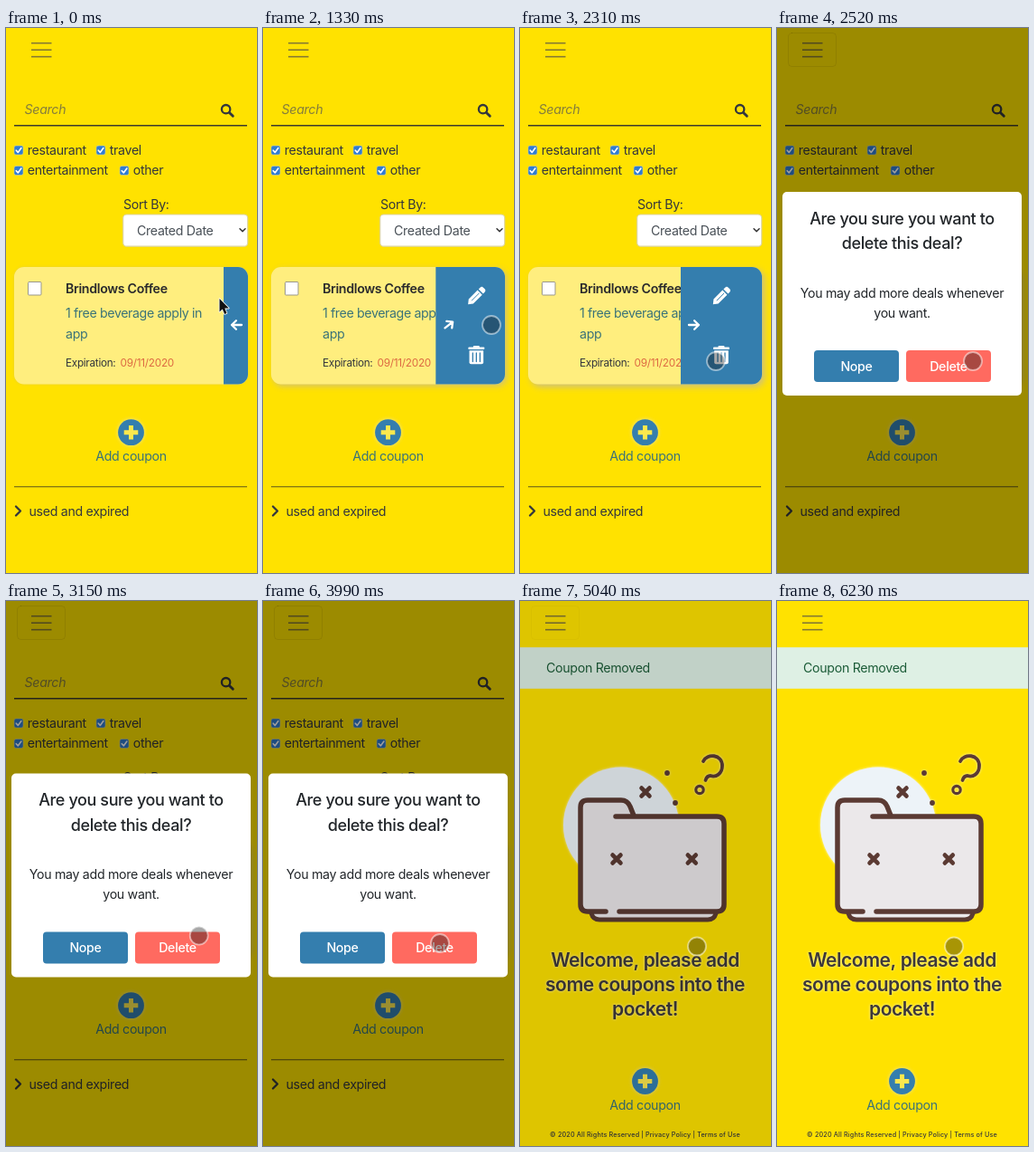
Animation, 278 px wide and 602 px high, one loop 6.3 s. Source, as an HTML page with a canvas:

```html
<!DOCTYPE html>
<html lang="en">
<head>
<meta charset="utf-8">
<title>Coupon pocket</title>
<style>
html, body { margin: 0; width: 100%; height: 100%; overflow: hidden; background: #ffe200; }
canvas { display: block; width: 278px; height: 602px; }
</style>
</head>
<body>
<canvas id="stage"></canvas>
<script>
const W = 278, H = 602, LOOP = 6300, STEP = 70;
const YELLOW = '#ffe200', BLUE = '#347eae', INK = '#33363d', LINK = '#3a7378', BROWN = '#5b3a33';
const canvas = document.getElementById('stage');
const ctx = canvas.getContext('2d');
const ratio = window.devicePixelRatio || 1;
canvas.width = W * ratio;
canvas.height = H * ratio;

const clamp = v => Math.max(0, Math.min(1, v));
const progress = (t, start, length) => clamp((t - start) / length);
const easeOut = p => 1 - (1 - p) ** 2;
const easeInOut = p => p * p * (3 - 2 * p);
const mix = (a, b, p) => a + (b - a) * p;

function text(str, x, y, { size = 14.2, weight = 400, color = INK, align = 'left', style = '', track = -0.022 } = {}) {
  ctx.font = `${style} ${weight} ${size}px Inter, Roboto, sans-serif`;
  ctx.letterSpacing = `${size * track}px`;
  ctx.textAlign = align;
  ctx.fillStyle = color;
  ctx.fillText(str, x, y);
}

function box(x, y, w, h, r, fill, stroke, line = 1) {
  ctx.beginPath();
  ctx.roundRect(x, y, w, h, r);
  if (fill) { ctx.fillStyle = fill; ctx.fill(); }
  if (stroke) { ctx.strokeStyle = stroke; ctx.lineWidth = line; ctx.stroke(); }
}

function disc(x, y, r, fill, stroke, line = 1) {
  ctx.beginPath();
  ctx.arc(x, y, r, 0, Math.PI * 2);
  if (fill) { ctx.fillStyle = fill; ctx.fill(); }
  if (stroke) { ctx.strokeStyle = stroke; ctx.lineWidth = line; ctx.stroke(); }
}

function stroke(d, color, width, cap = 'round') {
  ctx.strokeStyle = color;
  ctx.lineWidth = width;
  ctx.lineCap = cap;
  ctx.lineJoin = 'round';
  ctx.stroke(new Path2D(d));
}

function at(x, y, angle, draw) {
  ctx.save();
  ctx.translate(x, y);
  ctx.rotate(angle);
  draw();
  ctx.restore();
}

function withShadow(color, blur, dx, dy, draw) {
  ctx.save();
  ctx.shadowColor = color;
  ctx.shadowBlur = blur * ratio;
  ctx.shadowOffsetX = dx * ratio;
  ctx.shadowOffsetY = dy * ratio;
  draw();
  ctx.restore();
}

function menu(focus) {
  if (focus) box(12.5, 5.5, 53, 37, 4, null, `rgba(0,0,0,${0.08 * focus})`);
  for (const y of [16.7, 24.2, 31.7]) stroke(`M28 ${y}H50.5`, '#857a32', 1.6, 'butt');
}

function checkbox(x, y, label) {
  box(x - 5, y - 5, 10, 10, 2, '#2f7cd3', '#d9d590', 0.6);
  stroke(`M${x - 2.7} ${y + 0.2}l2 2.2l3.6 -4.8`, '#fff', 1.6);
  text(label, x + 9.7, y + 4.8);
}

function addCoupon(y) {
  withShadow('rgba(235,228,170,.9)', 4, 0, 0, () => disc(138.5, y, 14.4, BLUE));
  stroke(`M130.7 ${y}h15.6M138.5 ${y - 7.8}v15.6`, '#fbe84e', 5, 'butt');
  text('Add coupon', 138.5, y + 31, { color: LINK, align: 'center' });
}

function pencil() {
  ctx.fillStyle = '#fff';
  ctx.fill(new Path2D('M-13 0L-8.5 -3.6H5.5V3.6H-8.5ZM7 -3.6H9.5Q12 -3.6 12 -1.2V1.2Q12 3.6 9.5 3.6H7Z'));
  stroke('M-7 0H4', BLUE, 0.9);
}

function trash() {
  box(-9, -8.5, 18, 2.6, 1, '#fff');
  box(-3.5, -10, 7, 3, 1, '#fff');
  box(-7.8, -4.7, 15.6, 15, [0, 0, 2, 2], '#fff');
  stroke('M-4 -2V7.5M0 -2V7.5M4 -2V7.5', BLUE, 1.3);
}

function card(open) {
  const left = mix(241, 178, open);
  // The card lifts off the page while its panel opens.
  withShadow(`rgba(205,192,130,${mix(0.45, 1, open)})`, mix(3, 7, open), 3 * open, 3 * open,
    () => box(9, 264, 259, 129.5, 11, '#ffee7e'));
  box(24.5, 280.5, 14.5, 14.5, 1, '#fff', '#99978a');
  text('Brindlows Coffee', 66, 293, { weight: 600, color: '#29292c' });
  text('1 free beverage apply in', 66, 320, { color: LINK, track: -0.027 });
  text('app', 66, 343, { color: LINK });
  text('Expiration:', 66, 374, { size: 11.7 });
  text('09/11/2020', 126.5, 374, { size: 11.8, color: '#dd6a42' });

  ctx.save();
  ctx.beginPath();
  ctx.roundRect(9, 264, 259, 129.5, 11);
  ctx.clip();
  ctx.fillStyle = BLUE;
  ctx.fillRect(left, 264, 90, 130);
  at(left + 14.5, 328, Math.PI * (1 + open), () => stroke('M-5.5 0H5.5M0.6 -4.8L5.5 0L0.6 4.8', '#fff', 2.3));
  at(left + 45, 296, -Math.PI / 4, pencil);
  at(left + 45, 361, 0, trash);
  ctx.restore();
}

function listPage(open, focus) {
  menu(focus);
  text('Search', 20.5, 95.2, { style: 'italic', color: '#857d3c' });
  disc(243.6, 89.7, 4.7, null, INK, 2.3);
  stroke('M247.4 93.5L251.3 97.3', INK, 2.9);
  stroke('M9 107.7H267', '#3b3a2c', 1.5, 'butt');
  checkbox(14, 135, 'restaurant');
  checkbox(105, 135, 'travel');
  checkbox(14, 157.5, 'entertainment');
  checkbox(131, 157.5, 'other');
  text('Sort By:', 130, 199.8);
  box(129.7, 206, 138, 35.2, 4, '#fff', '#ddd49a', 1.2);
  text('Created Date', 145, 229, { color: '#495057' });
  stroke('M259 221.8l3 3l3 -3', '#333', 1.5);
  card(open);
  addCoupon(446.7);
  stroke('M9 506.8H267', '#5d551a', 1.1, 'butt');
  stroke('M11 528.5l5 5l-5 5', INK, 2.3);
  text('used and expired', 25.5, 538.7);
}

function cross(x, y, r) {
  stroke(`M${x - r} ${y - r}l${2 * r} ${2 * r}m0 ${-2 * r}l${-2 * r} ${2 * r}`, BROWN, 4.8);
}

function folder() {
  withShadow('rgba(255,255,255,.8)', 3, 0, 0, () => disc(112, 247.5, 64, '#edf3f8'));
  ctx.fillStyle = '#ebe8ea';
  ctx.fill(new Path2D('M67 228Q67 220 75 220H112Q119 220 122 227L127 238H218Q226 238 226 246V335Q226 343 217 343Q216 351 208 351H88Q80 351 79 343H75Q67 343 67 335Z'));
  stroke('M95 343H75Q67 343 67 335V228Q67 220 75 220H112Q119 220 122 227L126 237', BROWN, 5.5);
  stroke('M106 238H218Q226 238 226 246V335Q226 343 218 343H110', BROWN, 5.5);
  stroke('M79 345Q81 352 88 352H208Q215 352 217 345', BROWN, 5);
  cross(107, 285, 4.4);
  cross(190.3, 285, 4.4);
  cross(139, 211, 4.4);
  withShadow('rgba(255,255,255,.7)', 3, 0, 0, () => {
    disc(163, 190, 2.9, BROWN);
    disc(172, 223, 2.9, BROWN);
    stroke('M203 177C207 168 224 169 224 182C224 191 217 195 211 193Q207 193 205.5 198', BROWN, 3.8);
    disc(199, 208.5, 4.2, null, BROWN, 3.2);
  });
}

function emptyPage(focus) {
  menu(focus);
  ctx.fillStyle = '#def0e4';
  ctx.fillRect(0, 51, W, 46);
  stroke('M0 51.5H278M0 96.5H278', '#e2edbd', 1, 'butt');
  text('Coupon Removed', 29, 79, { color: '#1c5c38' });
  folder();
  withShadow('rgba(255,255,255,.75)', 3, 0, 0, () => {
    ['Welcome, please add', 'some coupons into the', 'pocket!'].forEach((line, i) =>
      text(line, 138.5, 403.5 + i * 27, { size: 21, weight: 600, color: '#3d3838', align: 'center' }));
  });
  addCoupon(530.5);
  text('© 2020 All Rights Reserved | Privacy Policy | Terms of Use', 138.5, 591.5,
    { size: 7.2, weight: 500, align: 'center', track: 0.022 });
}

function modal(top, alpha) {
  const button = (x, label, color) => {
    box(x, top + 175, 94, 35, 4, color);
    text(label, x + 47, top + 197.5, { weight: 500, color: '#fff', align: 'center' });
  };
  ctx.save();
  ctx.globalAlpha = alpha;
  box(6, top, 265, 225, 5, '#fff');
  const title = { size: 18, weight: 500, color: '#212529', align: 'center' };
  const body = { color: '#212529', align: 'center' };
  text('Are you sure you want to', 138.5, top + 35.5, title);
  text('delete this deal?', 138.5, top + 63.3, title);
  text('You may add more deals whenever', 138.5, top + 116.5, body);
  text('you want.', 138.5, top + 138.8, body);
  button(41, 'Nope', BLUE);
  button(143, 'Delete', '#ff6a60');
  ctx.restore();
}

// Pointer stops: [start, duration, x, y]
const stops = [[70, 630, 253, 328], [1500, 560, 217, 368], [2940, 840, 196, 378], [4270, 280, 196, 381.5]];

function pointer(t) {
  let x = 236.5, y = 299;
  for (const [start, length, toX, toY] of stops) {
    const p = easeInOut(progress(t, start, length));
    x = mix(x, toX, p);
    y = mix(y, toY, p);
  }
  if (t < 140) {
    at(x, y, 0, () => {
      const arrow = 'M0 0V14.5L3.2 11.5L5.6 17L8 16L5.8 10.6H10.3Z';
      stroke(arrow, '#fff', 1.6);
      ctx.fillStyle = '#111';
      ctx.fill(new Path2D(arrow));
    });
  } else {
    disc(x, y, 10, 'rgba(15,15,15,.36)', 'rgba(255,255,255,.5)', 1.8);
  }
}

function render(t) {
  ctx.setTransform(ratio, 0, 0, ratio, 0, 0);
  ctx.fillStyle = YELLOW;
  ctx.fillRect(0, 0, W, H);

  const dim = progress(t, 2350, 150) * (1 - progress(t, 4940, 150));
  if (t < 4690) listPage(easeOut(progress(t, 1168, 300)), dim);
  else emptyPage(dim);

  if (dim) {
    ctx.fillStyle = `rgba(0,0,0,${0.39 * dim})`;
    ctx.fillRect(0, 0, W, H);
  }

  const slideIn = easeOut(progress(t, 2372, 300));
  const slideOut = easeOut(progress(t, 4560, 300));
  const alpha = progress(t, 2372, 140) * (1 - progress(t, 4560, 150));
  if (alpha) modal(190.5 - 37 * (1 - slideIn + slideOut), alpha);
  pointer(t);
}

const origin = performance.now();
function tick() {
  const t = (performance.now() - origin) % LOOP;
  render(Math.floor(t / STEP) * STEP);
  requestAnimationFrame(tick);
}
tick();
</script>
</body>
</html>
```
